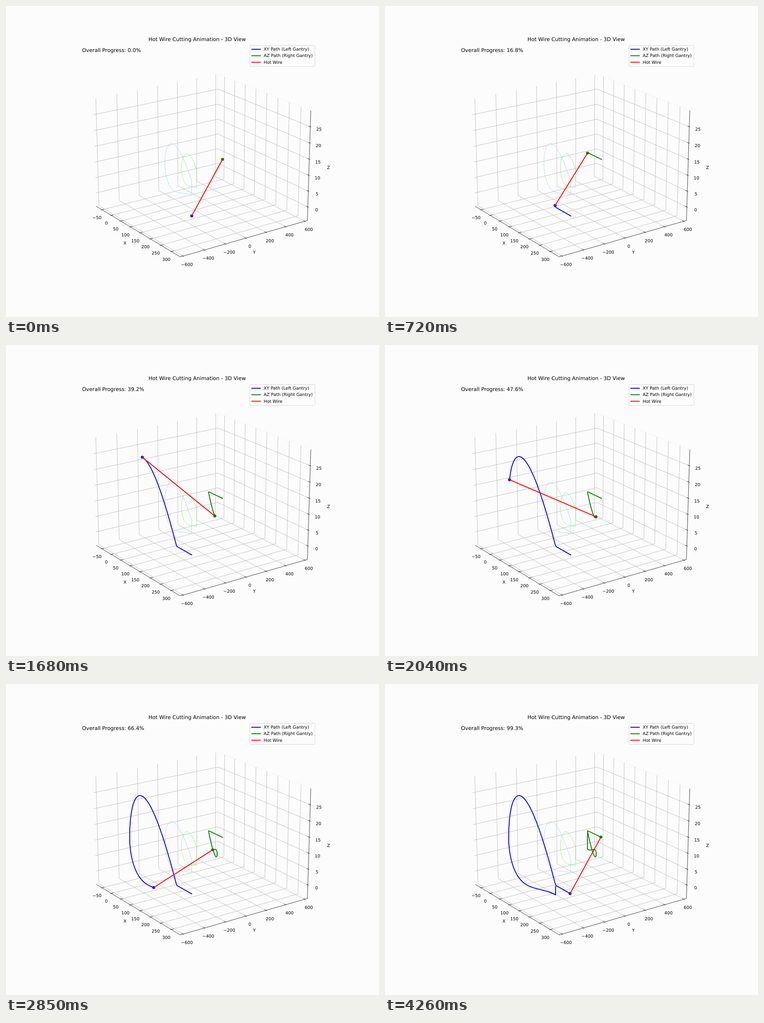
Recreate the animation shown at these times as an HTML page. Size 820 by 683 pixels, loop 4290 ms.

```html
<!DOCTYPE html>
<html lang="en">
<head>
<meta charset="utf-8">
<title>Hot Wire Cutting</title>
<style>
  html, body { margin: 0; width: 100%; height: 100%; overflow: hidden; background: #fcfcfc; }
  svg { display: block; width: 100vw; height: 100vh; }
  text { font-family: "DejaVu Sans", Verdana, sans-serif; font-size: 9.49px; text-rendering: geometricPrecision; }
  .big { font-size: 11.39px; }
  .mid { text-anchor: middle; }
  polyline, line { fill: none; }
  .pane { stroke: #f2f2f2; stroke-width: .8; }
  .grid { stroke: #b0b0b0; stroke-width: .76; }
  .axis { stroke: #000; stroke-width: .76; }
  .foil { stroke-width: 1; opacity: .9; }
  .trail { stroke-width: 1.9; stroke-linejoin: round; stroke-linecap: square; }
</style>
</head>
<body>
<svg viewBox="0 0 820 683">
  <g id="plot"></g>
  <text class="big mid" x="420.2" y="76.6">Hot Wire Cutting Animation - 3D View</text>
  <text class="big" id="progress" x="167.3" y="101"></text>
  <g id="foils"></g>
  <polyline class="trail" id="leftTrail" stroke="#00f"/>
  <polyline class="trail" id="rightTrail" stroke="#008000"/>
  <circle id="leftDot" r="3.2" fill="#00f"/>
  <circle id="rightDot" r="3.2" fill="#008000"/>
  <line class="trail" id="wire" stroke="#f00"/>
  <g id="legend">
    <rect x="536.4" y="86.6" width="142.8" height="46" rx="2" fill="#fcfcfc" stroke="#d6d6d6" stroke-width=".95"/>
  </g>
</svg>
<script>
const $ = id => document.getElementById(id);

function add(parent, tag, attrs, text) {
  const el = document.createElementNS("http://www.w3.org/2000/svg", tag);
  for (const k in attrs) el.setAttribute(k, attrs[k]);
  if (text !== undefined) el.textContent = text;
  parent.appendChild(el);
  return el;
}

// Perspective camera around a box of half sizes A, A, H
const A = .5952, H = .4464, SCALE = 2842.8, CX = 427.36, CY = 337.8, DIST = 10;
const rad = Math.PI / 180;
const ce = Math.cos(20 * rad), se = Math.sin(20 * rad);
const ca = Math.cos(35 * rad), sa = Math.sin(35 * rad);

function project([x, y, z]) {
  const u = sa * x + ca * y;
  const v = -se * ca * x + se * sa * y + ce * z;
  const w = DIST - (ce * (ca * x - sa * y) + se * z);
  return [CX + SCALE * u / w, CY - SCALE * v / w];
}

const fix = p => p.map(n => n.toFixed(2)).join();
const toPoints = list => list.map(fix).join(" ");
const plot = $("plot");
const stroke = (cls, ...pts) => add(plot, "polyline", { class: cls, points: toPoints(pts.map(project)) });

function label([x, y], dx, dy, text) {
  add(plot, "text", { class: "mid", x: x + dx, y: y + dy + 3.45 }, String(text).replace("-", "\u2212"));
}

const range = (from, to, step = 1) =>
  Array.from({ length: Math.floor((to - from) / step) + 1 }, (_, i) => from + i * step);

const IN = A / 30, OUT = A / 60;
const axes = [
  { ticks: range(-50, 300, 50), lo: -81.7, hi: 341, half: A, shift: [-11, 17.2],
    grid: p => [[p, -A, -H], [p, A, -H], [p, A, H]],
    tick: p => [[p, -A + IN, -H], [p, -A - OUT, -H]], at: p => [p, -A, -H] },
  { ticks: range(-600, 600, 200), lo: -626, hi: 626, half: A, shift: [8.5, 18.1],
    grid: p => [[A, p, -H], [-A, p, -H], [-A, p, H]],
    tick: p => [[A - IN, p, -H], [A + OUT, p, -H]], at: p => [A, p, -H] },
  { ticks: range(0, 25, 5), lo: -4.345, hi: 29.9, half: H, shift: [19.1, 5.9],
    grid: p => [[A, A, p], [-A, A, p], [-A, -A, p]],
    tick: p => [[A - IN, A, p], [A + OUT, A, p]], at: p => [A, A, p] }
];
const place = (n, a) => ((n - a.lo) / (a.hi - a.lo) * 2 - 1) * a.half;

stroke("pane", [A, A, H], [-A, A, H], [-A, A, -H], [A, A, -H]);
for (const a of axes)
  for (const n of a.ticks) stroke("grid", ...a.grid(place(n, a)));
stroke("axis", [-A, -A, -H], [A, -A, -H], [A, A, -H], [A, A, H]);
for (const a of axes)
  for (const n of a.ticks) {
    const p = place(n, a);
    stroke("axis", ...a.tick(p));
    label(project(a.at(p)), ...a.shift, n);
  }
label([261.5, 520.3], 0, 0, "X");
label([546, 541], 0, 0, "Y");
label([709, 354.5], 0, 0, "Z");

[["XY Path (Left Gantry)", "#00f"], ["AZ Path (Right Gantry)", "#008000"], ["Hot Wire", "#f00"]]
  .forEach(([name, color], i) => {
    const y = 95 + 14.25 * i;
    add($("legend"), "line", { class: "trail", x1: 540.3, x2: 559.2, y1: y, y2: y, stroke: color });
    add($("legend"), "text", { x: 566.6, y: y + 3.2 }, name);
  });

// Wing section: tail corner, tail gap, nose, and bulge of each side as [at nose, change towards tail].
// w runs from 1 (upper tail) through 0 (nose) to -1 (lower tail).
const section = (tail, gap, nose, upper, lower) => w => {
  const c = w * w, [a, b] = w > 0 ? upper : lower;
  const end = tail[1] + (w > 0 ? 0 : gap);
  return [
    nose[0] + (tail[0] - nose[0]) * c,
    nose[1] + (end - nose[1]) * c - (a + b * c) * w * (1 - c)
  ];
};

const leftHome = [408.3, 461], leftTail = [375, 442];
const rightHome = [476, 336.8], rightTail = [445, 322];
const left = section(leftTail, 21, [271.7, 338], [322, -24], [190, -120]);
const right = section(rightTail, 40.5, [464.3, 372], [-45, 0], [-25, 32]);

function drawFoil(color, shape) {
  const line = range(-50, 50).map(i => shape(-i / 50));
  line.push(line[0]);
  add($("foils"), "polyline", { class: "foil", stroke: color, points: toPoints(line) });
}
drawFoil("lightblue", section([408, 384], 31, [349.3, 346], [143, 0], [118, -72]));
drawFoil("lightgreen", section([419, 360], 39, [385.7, 355], [74, 28], [73, -42]));

// Even feed along the left section; height counts less than width
const FINE = 2000, TALL = 15;
const fineW = i => 1 - 2 * i / FINE;
const lengths = [0];
for (let i = 1; i <= FINE; i++) {
  const p = left(fineW(i - 1)), q = left(fineW(i));
  lengths.push(lengths[i - 1] + Math.hypot(q[0] - p[0], (q[1] - p[1]) / TALL));
}
function feed(s) {
  const eased = s + .13 * s * (1 - s) ** 2;
  return fineW(lengths.findIndex(d => d >= eased * lengths[FINE] - 1e-9));
}

const STEPS = 143, STEP_MS = 30, ENTER = 23.6, CUT_END = 118, LEAVE = 119.4;
const mix = (a, b, k) => a.map((v, i) => v + (b[i] - v) * k);

function pose(step) {
  const both = (a, b, k) => [mix(a[0], b[0], k), mix(a[1], b[1], k)];
  const home = [leftHome, rightHome], tail = [leftTail, rightTail];
  if (step < ENTER) return both(home, tail, step / ENTER);
  if (step <= CUT_END) {
    const w = feed((step - ENTER) / (CUT_END - ENTER));
    return [left(w), right(w)];
  }
  if (step < LEAVE) return both([left(-1), right(-1)], tail, (step - CUT_END) / (LEAVE - CUT_END));
  return both(tail, home, (step - LEAVE) / (STEPS - LEAVE));
}
const poses = range(0, STEPS - 1).map(pose);

function set(id, attrs) {
  for (const k in attrs) $(id).setAttribute(k, attrs[k]);
}

function draw(now) {
  const step = Math.floor(now / STEP_MS) % STEPS;
  const seen = poses.slice(0, step + 1);
  const [[lx, ly], [rx, ry]] = poses[step];
  set("leftTrail", { points: toPoints(seen.map(p => p[0])) });
  set("rightTrail", { points: toPoints(seen.map(p => p[1])) });
  set("leftDot", { cx: lx, cy: ly });
  set("rightDot", { cx: rx, cy: ry });
  set("wire", { x1: lx, y1: ly, x2: rx, y2: ry });
  $("progress").textContent = `Overall Progress: ${(step / STEPS * 100).toFixed(1)}%`;
}

function tick() {
  draw(performance.now());
  requestAnimationFrame(tick);
}
tick();
</script>
</body>
</html>
```
